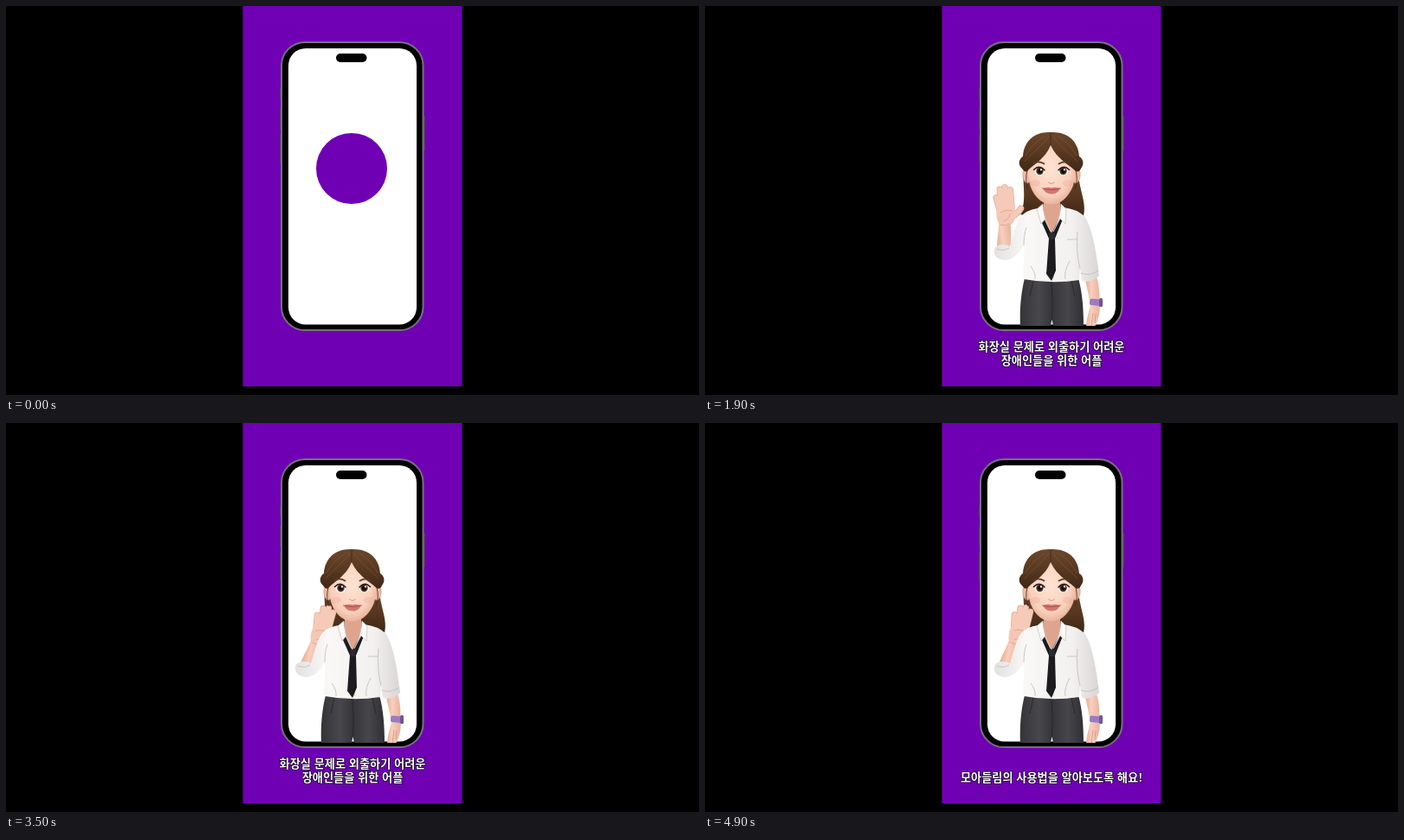
Animation of 800x450 px, one loop 5000 ms. Source, as an HTML page:

```html
<!DOCTYPE html>
<html lang="ko">
<head>
<meta charset="utf-8">
<title>App intro</title>
<style>
  html, body { margin: 0; width: 100%; height: 100%; overflow: hidden; background: #000; }
  svg { display: block; width: 100%; height: 100%; }
  text {
    font: 700 13.2px "Noto Sans CJK KR", "Noto Sans CJK", "Noto Sans", sans-serif;
    text-anchor: middle; fill: #fff;
    stroke: #17002b; stroke-width: 1.6px; stroke-linejoin: round; paint-order: stroke;
  }
</style>
</head>
<body>
<svg viewBox="0 0 800 450">
  <defs>
    <clipPath id="screen"><rect x="326" y="49" width="148" height="321" rx="20"/></clipPath>
    <linearGradient id="hair" x1="0" y1="0" x2="0" y2="1">
      <stop offset="0" stop-color="#6b472d"/><stop offset=".55" stop-color="#57371f"/><stop offset="1" stop-color="#3f2718"/>
    </linearGradient>
    <radialGradient id="face" cx=".48" cy=".45" r=".6">
      <stop offset="0" stop-color="#ffe3d3"/><stop offset=".7" stop-color="#f8d0bc"/><stop offset="1" stop-color="#e3a88f"/>
    </radialGradient>
    <linearGradient id="skin">
      <stop offset="0" stop-color="#e2a890"/><stop offset=".45" stop-color="#f8cfbd"/><stop offset="1" stop-color="#e8b29c"/>
    </linearGradient>
    <linearGradient id="shirt">
      <stop offset="0" stop-color="#e3e0df"/><stop offset=".3" stop-color="#f9f8f6"/><stop offset=".75" stop-color="#f3f1ef"/><stop offset="1" stop-color="#d8d5d4"/>
    </linearGradient>
    <linearGradient id="pants">
      <stop offset="0" stop-color="#353438"/><stop offset=".3" stop-color="#48474b"/><stop offset=".5" stop-color="#363539"/><stop offset=".75" stop-color="#47464a"/><stop offset="1" stop-color="#302f33"/>
    </linearGradient>
  </defs>

  <rect width="800" height="450"/>
  <rect x="273.5" width="253" height="440" fill="#6f00b4"/>

  <!-- phone -->
  <g fill="#4d4158">
    <rect x="316" y="95" width="4" height="13" rx="1"/>
    <rect x="316" y="119" width="4" height="24" rx="1"/>
    <rect x="316" y="149" width="4" height="32" rx="1"/>
    <rect x="480" y="127" width="4" height="40" rx="1"/>
  </g>
  <rect x="318" y="42" width="163.500" height="333" rx="27" fill="#000" stroke="#77707f" stroke-width="2"/>
  <rect x="326" y="49" width="148" height="319.500" rx="20" fill="#fff"/>

  <circle id="mark" cx="399" cy="188" r="41" fill="#6f00b4"/>

  <g id="guide" clip-path="url(#screen)">
    <!-- back hair -->
    <path fill="url(#hair)" d="M368 190C366 208 372 224 364 241Q380 246 392 238L410 236Q424 243 437 243C441 226 431 212 431 190Z"/>

    <!-- lowered arm -->
    <path fill="url(#skin)" d="M438 313L452 313C455 323 456 332 455 342C457 351 455 362 450 371L440 371C440 363 443 355 445 346Q442 330 438 313Z"/>
    <path fill="none" stroke="#cf957f" stroke-width=".8" d="M448 355L446 370M451 356L450 366"/>
    <rect x="444" y="339" width="14" height="7.500" rx="2" fill="#9b7cc2" transform="rotate(5 451 343)"/>
    <rect x="455" y="338" width="4" height="10" rx="1.500" fill="#735497"/>

    <!-- trousers -->
    <path fill="url(#pants)" d="M369 315H431C436 333 437 352 437 372H402.500L400.500 363L398.500 372H364C363 350 365 331 369 315Z"/>
    <path fill="none" stroke="#29282c" d="M400 320Q402 343 400.500 363M379 318L375 336M423 318L427 336"/>

    <!-- neck -->
    <path fill="#dfa48d" d="M391 217H410V237L417 244L401 270L387 243L391 237Z"/>

    <!-- waving arm -->
    <g id="wave">
      <path fill="url(#skin)" d="M337 287C338 273 342 263 344 251L357 251C358 264 354 275 353 288Z"/>
      <g stroke="#e0a58e" stroke-width="7.300" stroke-linecap="round">
        <path d="M347 237L344.800 221M351 233L350 212M356 233L356 210.500M361 235L362 214M361 244Q367 243 371.500 237" fill="none"/>
      </g>
      <path fill="#f4c7b4" d="M343.600 234Q354 226 364.600 233L365 241Q365 249 358 254Q350 256 344 252Q341 243 343.600 234Z"/>
      <g stroke="#f6cab8" stroke-width="6" stroke-linecap="round">
        <path d="M347 237L344.800 221M351 233L350 212M356 233L356 210.500M361 235L362 214M361 244Q367 243 371.500 237" fill="none"/>
      </g>
      <path fill="none" stroke="#dfa28d" stroke-width=".8" d="M347 239Q355 235 362 239M350 249Q357 247 359 241M345 253Q351 255 357 253"/>
    </g>

    <!-- shirt -->
    <path fill="url(#shirt)" d="M385 234C376 235 368 238 363 246C357 257 355 269 352 278Q342 273 335 279Q332 286 337 291Q346 297 356 291Q363 286 368 277C370 290 366 304 368 316Q400 322 432 317L433 303L435 318Q445 321 455 312C452 288 448 258 438 243Q429 235 414 233L401 272Z"/>
    <path fill="none" stroke="#c4c0c0" stroke-width=".9" d="M368 277Q368 264 371 256M433 304Q428 285 430 261M337 281Q344 284 351 280M434 309Q444 313 454 306M376 301Q382 309 381 316M421 295Q414 308 416 316M402 273V316M418 270H429"/>

    <!-- collar and tie -->
    <path fill="#1c1b20" d="M386 244L390 244L400 263L411 242L414 244L404 269L405 306L400 318L394 310L397 269Z"/>
    <path fill="#2c2b31" d="M397 262H404L403 270H398Z"/>
    <path fill="#fbfaf8" stroke="#c9c5c4" stroke-width=".8" stroke-linejoin="round" d="M390 229L383 235L388 252L393 246L399 261Q391 247 390 229ZM411 229L417 235L416 252L410 246L402 261Q410 247 411 229Z"/>

    <!-- head -->
    <g fill="#edb9a3" stroke="#d3947e" stroke-width=".6">
      <ellipse cx="371" cy="197" rx="4" ry="8" transform="rotate(-10 371 197)"/>
      <ellipse cx="429" cy="197" rx="4" ry="8" transform="rotate(10 429 197)"/>
    </g>
    <path fill="url(#face)" d="M372 184C371 164 382 154 400 154C418 154 429 164 428 184C428 204 424 216 413 225Q400 234 387 225C376 216 373 204 372 184Z"/>
    <path fill="url(#hair)" d="M399 146C381 145 368 156 367 174C362 177 361 184 366 188Q369 193 372 191C378 184 392 178 399 161C407 178 421 184 428 191Q432 193 434 188C438 183 437 177 432 174C431 156 418 145 399 146Z"/>
    <path fill="none" stroke="#875d3c" stroke-width=".8" opacity=".65" d="M397 151C387 164 377 170 369 180M392 151C382 157 374 165 370 174M402 151C411 164 421 170 430 180M408 151C418 157 425 165 429 174"/>
    <path fill="none" stroke="#3d2617" stroke-width=".8" d="M399 147V161M372 190Q369 202 373 212M428 190Q431 202 427 212"/>

    <g id="eyes"></g>
    <g fill="#ef9f94" opacity=".28"><ellipse cx="381" cy="205" rx="6" ry="4"/><ellipse cx="419" cy="205" rx="6" ry="4"/></g>
    <path fill="none" stroke="#d99c85" stroke-linecap="round" d="M396.500 204Q400 207 403.500 204"/>
    <path fill="#d5756f" d="M390 211Q396 209 400 210.500Q404 209 410 211Q407 217.500 400 217.500Q393 217.500 390 211Z"/>
    <path fill="none" stroke="#a44d4d" stroke-width=".9" stroke-linecap="round" d="M389.500 211Q400 214.500 410.500 211"/>
  </g>

  <rect x="381" y="55" width="35.500" height="10" rx="5"/>
  <text id="top" x="400" y="399"></text>
  <text id="bottom" x="400" y="415"></text>
</svg>
<script>
  const LOOP = 5000, STEP = 100, GUIDE_AT = 1200, OUTRO_AT = 4700;
  const $ = id => document.getElementById(id);

  const eye = (x, side) => `
    <ellipse cx="${x}" cy="191.300" rx="5.800" ry="4.700" fill="#fff"/>
    <circle cx="${x}" cy="191" r="4.200" fill="#4a2e22"/>
    <circle cx="${x}" cy="191" r="2.400" fill="#120b0a"/>
    <circle cx="${x + 1.4}" cy="189.400" r="1.100" fill="#fff"/>
    <path fill="none" stroke="#2a1914" stroke-width="1.500" stroke-linecap="round"
      d="M${x - side * 5.5} 190Q${x} 183 ${x + side * 7} 189.500"/>
    <path fill="none" stroke="#5a3a29" stroke-width="1.700" stroke-linecap="round"
      d="M${x - side * 5} 182.500Q${x + side * 2} 178.500 ${x + side * 7} 182"/>`;
  $('eyes').innerHTML = eye(386.5, -1) + eye(413.5, 1);

  const show = (id, on) => $(id).setAttribute('visibility', on ? 'visible' : 'hidden');
  const say = (id, line) => { if ($(id).textContent !== line) $(id).textContent = line; };

  function draw(ms) {
    const t = Math.floor(ms % LOOP / STEP) * STEP;
    const guide = t >= GUIDE_AT, outro = t >= OUTRO_AT;
    show('mark', !guide);
    show('guide', guide);

    const phase = (1.048 * (t - 1500) - 113) * Math.PI / 180;
    $('wave').setAttribute('transform', `rotate(${-12.5 * Math.cos(phase)} 346 288)`);

    say('top', guide && !outro ? '화장실 문제로 외출하기 어려운' : '');
    say('bottom', outro ? '모아들림의 사용법을 알아보도록 해요!' : guide ? '장애인들을 위한 어플' : '');
  }

  const start = performance.now();
  function tick() {
    draw(performance.now() - start);
    requestAnimationFrame(tick);
  }
  tick();
</script>
</body>
</html>
```
